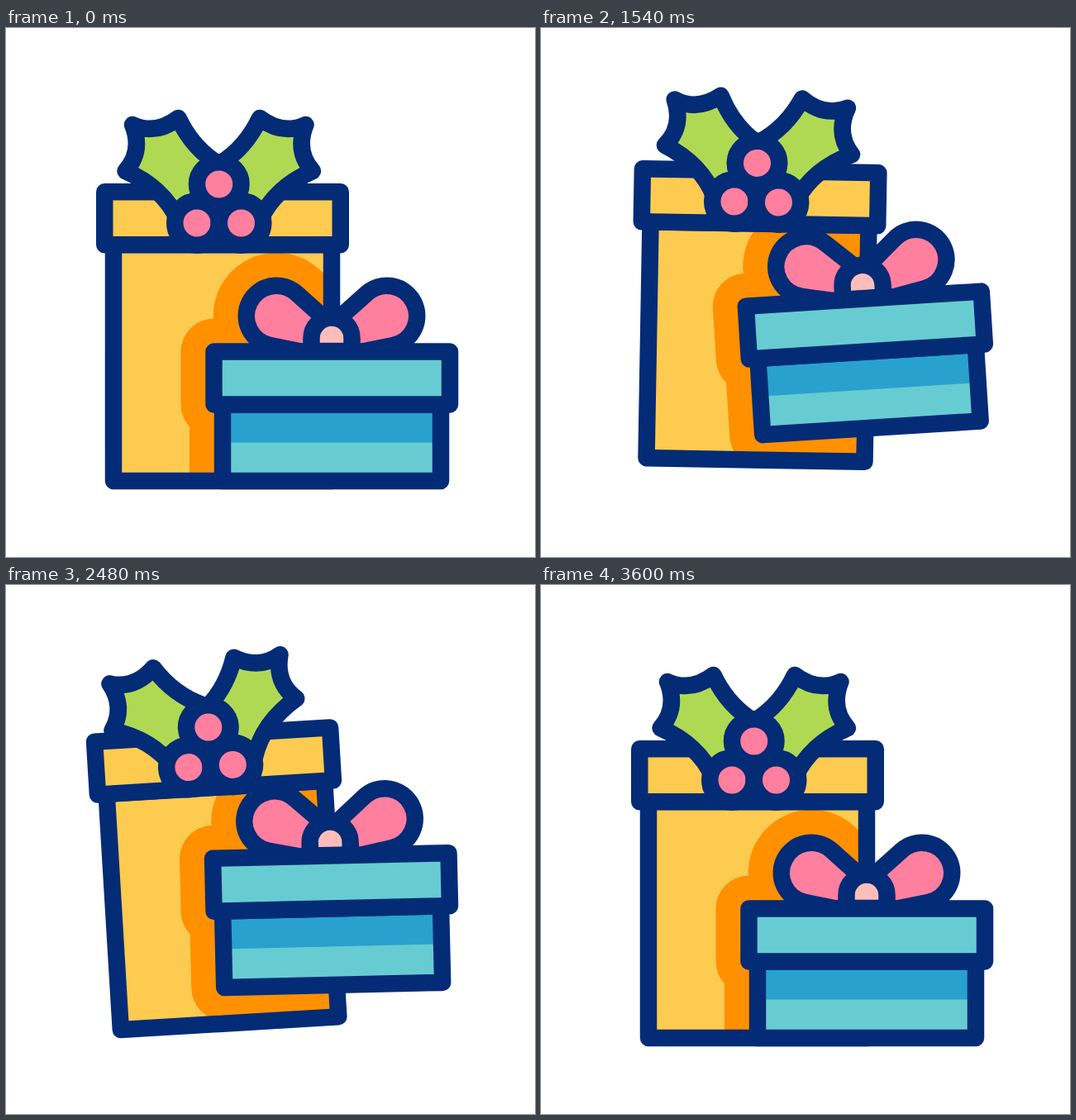
Write an HTML page that moves like this. It is 640 px wide and 640 px high and loops after 3.62 s.

```html
<!DOCTYPE html>
<html lang="en">
<head>
<meta charset="utf-8">
<title>Gift boxes</title>
<style>
  html, body { margin: 0; width: 100%; height: 100%; overflow: hidden; background: #fff; }
  svg { display: block; width: 100%; height: 100%; }
  .ink { stroke: #042b76; stroke-width: 20.5; stroke-linejoin: round; stroke-linecap: round; }
  .shade { fill: #ff9000; stroke: #ff9000; stroke-width: 80; stroke-linejoin: round; }
  .yellow { fill: #fdcb50; }
  .green { fill: #b0d953; }
  .pink { fill: #ff7f9f; }
  .teal { fill: #67ccd1; }
</style>
</head>
<body>
<svg viewBox="0 0 640 640">
  <defs>
    <path id="loop" d="M394 359L351.5 321A36.5 36.5 0 1 0 319.7 384L394 399Z"/>
    <path id="knot" d="M369.5 391V375A24.5 24.5 0 0 1 418.5 375V391Z"/>
    <path id="lid" d="M251.5 391.5H537V455.5H251.5Z"/>
    <path id="base" d="M262 455.5H526V548H262Z"/>
    <path id="leaf" d="M208.5 109Q181 130 153 117Q166 149 144.5 173Q190 193 208 232L250 215L258 165Q226 146 208.5 109Z"/>
    <path id="body" d="M130 262H394V548H130Z"/>
    <clipPath id="inside"><use href="#body" class="tall"/></clipPath>
  </defs>

  <use href="#body" class="tall yellow"/>
  <g clip-path="url(#inside)">
    <g class="small shade">
      <use href="#loop"/>
      <use href="#loop" transform="matrix(-1 0 0 1 788 0)"/>
      <use href="#knot"/>
      <use href="#lid"/>
      <use href="#base"/>
    </g>
  </g>

  <g class="tall ink">
    <use href="#body" fill="none"/>
    <path class="yellow" d="M119.25 198.25H404.75V262.25H119.25Z"/>
    <g class="green">
      <g id="leafL"><use href="#leaf"/></g>
      <g id="leafR"><use href="#leaf" transform="matrix(-1 0 0 1 515.5 0)"/></g>
    </g>
    <g class="pink">
      <circle cx="257.75" cy="189" r="26.75"/>
      <circle cx="231" cy="236" r="26.75"/>
      <circle cx="284.5" cy="236" r="26.75"/>
    </g>
  </g>

  <g class="small">
    <g class="ink pink">
      <use href="#loop"/>
      <use href="#loop" transform="matrix(-1 0 0 1 788 0)"/>
    </g>
    <use href="#knot" class="ink" fill="#ffbdba"/>
    <use href="#base" class="teal"/>
    <path fill="#28a1ce" d="M262 455.5H526V501.5H262Z"/>
    <use href="#base" class="ink" fill="none"/>
    <use href="#lid" class="ink teal"/>
  </g>
</svg>
<script>
const LOOP = 3620, RISE = 864, SWING = 432, DELAY = 576;
const FALL = RISE + 3 * SWING;

const ease = u => {
  u = Math.min(1, Math.max(0, u));
  return u * u * (3 - 2 * u);
};

// Height from 0 to 1: up, hold, down
const lift = t => ease(t / RISE) - ease((t - FALL) / RISE);

// Swing from -1 to 1, reversing three times while lifted
const sway = t => {
  let a = ease(t / RISE);
  for (let i = 0; i < 3; i++) {
    a += (i % 2 ? 2 : -2) * ease((t - RISE - i * SWING) / SWING);
  }
  return a + ease((t - FALL) / RISE);
};

const pose = (sel, value) =>
  document.querySelectorAll(sel).forEach(el => el.setAttribute('transform', value));

function draw(t) {
  const turn = sway(t), late = t - DELAY;
  pose('.tall', `translate(0 ${-25.5 * lift(t)}) rotate(${5 * turn} 262 405)`);
  pose('#leafL', `rotate(${12 * turn} 232 201)`);
  pose('#leafR', `rotate(${12 * turn} 283.5 201)`);
  pose('.small', `translate(0 ${-64 * lift(late)}) rotate(${-5 * sway(late)} 394 454)`);
}

function tick(now) {
  draw(now % LOOP);
  requestAnimationFrame(tick);
}
draw(0);
requestAnimationFrame(tick);
</script>
</body>
</html>
```
